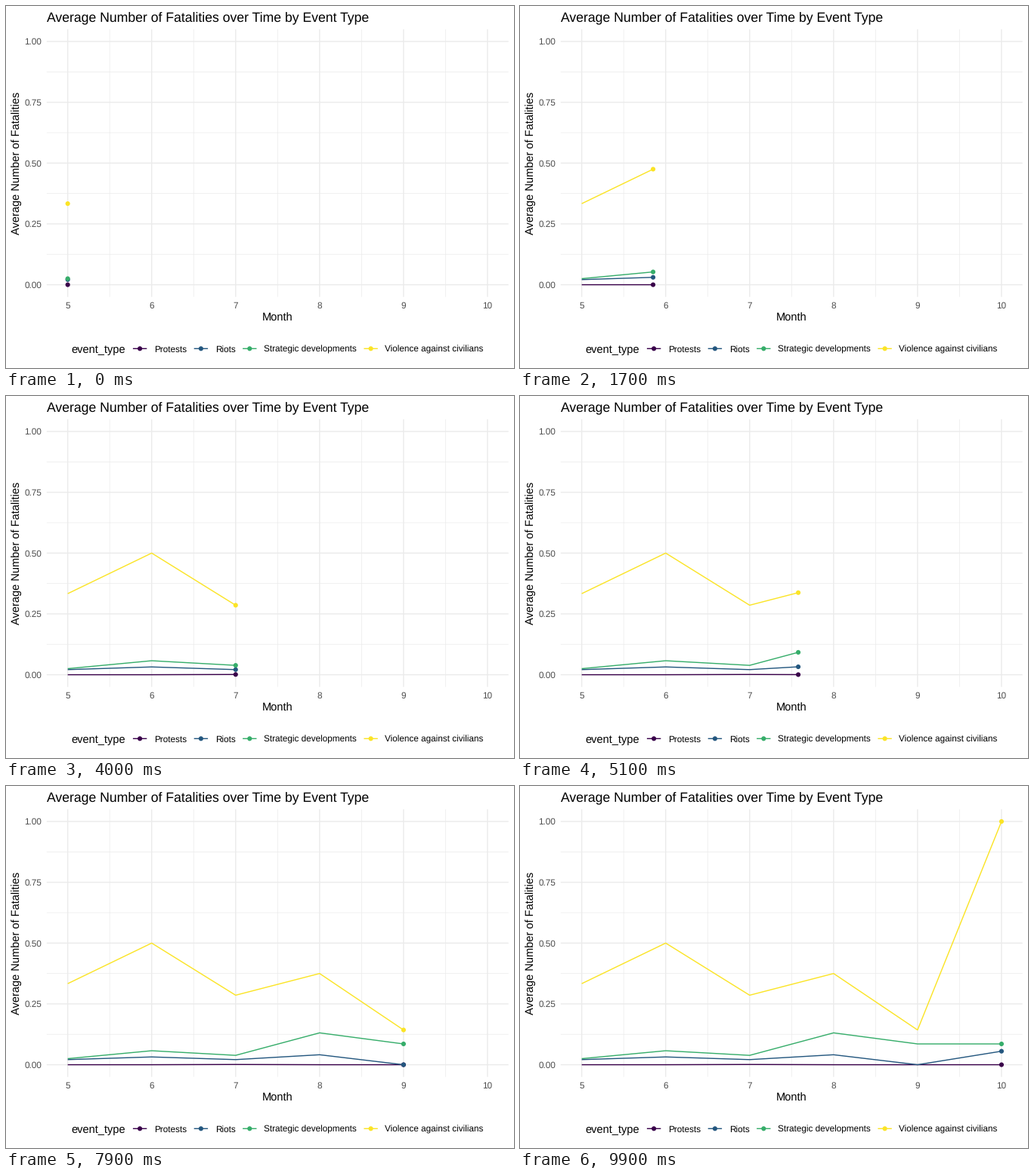
Animation of 672 by 480 pixels, one loop 10000 ms. Source, as a matplotlib script:

```python
import numpy as np
import matplotlib.pyplot as plt
from matplotlib.animation import FuncAnimation
from matplotlib.patches import Circle

W, H, DPI = 672, 480, 96
PX = 72 / DPI                      # one pixel in points
LEFT, RIGHT, TOP, BOTTOM = 53.9, 664.7, 30.9, 385.7
INK, GREY, GRID = "black", "#4d4d4d", "#ebebeb"

plt.rcParams.update({
    "font.family": "Liberation Sans",
    "text.hinting": "none",
    "text.hinting_factor": 8,
    "path.simplify": False,
})

MONTHS = np.arange(5, 11)
SERIES = [
    ("Protests", "#39004a", [0, 0, 0.001, 0, 0, 0], 177.1, 196.0),
    ("Riots", "#24577f", [0.021, 0.032, 0.021, 0.041, 0, 0.0555], 257.9, 276.7),
    ("Strategic developments", "#36ad6a",
     [0.025, 0.0575, 0.0385, 0.131, 0.0855, 0.0855], 322.3, 341.1),
    ("Violence against civilians", "#fbe426",
     [1 / 3, 1 / 2, 2 / 7, 3 / 8, 1 / 7, 1], 482.6, 501.4),
]
# Frame at which each month is reached
KEYS = [0, 20, 40, 59, 79, 99]


def px(month):
    return LEFT + (np.asarray(month) - 4.75) * (RIGHT - LEFT) / 5.5


def py(value):
    return BOTTOM - (np.asarray(value) + 0.05) * (BOTTOM - TOP) / 1.1


fig = plt.figure(figsize=(W / DPI, H / DPI), dpi=DPI, facecolor="white")
ax = fig.add_axes([0, 0, 1, 1])
ax.set_xlim(0, W)
ax.set_ylim(H, 0)
ax.axis("off")


def line(xs, ys, color, width=1.42, z=3):
    return ax.plot(xs, ys, color=color, lw=width * PX, zorder=z, snap=False,
                   solid_capstyle="butt", solid_joinstyle="round")[0]


def dot(x, y, color):
    return ax.add_patch(Circle((x, y), 3.07, fc=color, ec="none", zorder=4))


def label(x, y, s, size, color=INK, ha="left", **kw):
    ax.text(x, y, s, fontsize=size, color=color, ha=ha, va="baseline", **kw)


def draw_grid():
    for m in MONTHS[:-1] + 0.5:
        line([px(m)] * 2, [TOP, BOTTOM], GRID, 0.71, 1)
    for v in np.arange(0.125, 1, 0.25):
        line([LEFT, RIGHT], [py(v)] * 2, GRID, 0.71, 1)
    for m in MONTHS:
        line([px(m)] * 2, [TOP, BOTTOM], GRID, z=2)
        label(px(m), 401, str(m), 8.8, GREY, "center")
    for v in np.linspace(0, 1, 5):
        line([LEFT, RIGHT], [py(v)] * 2, GRID, z=2)
        label(47.3, py(v) + 4.2, f"{v:.2f}", 8.8, GREY, "right")


def draw_titles():
    label(LEFT - 0.4, 20, "Average Number of Fatalities over Time by Event Type", 13.2)
    label((LEFT + RIGHT) / 2, 418, "Month", 11, ha="center")
    label(18, (TOP + BOTTOM) / 2, "Average Number of Fatalities", 11,
          ha="center", rotation=90, rotation_mode="anchor")


def draw_legend():
    label(86.5, 460, "event_type", 11)
    for name, color, _, key_x, text_x in SERIES:
        line([key_x - 9.2, key_x + 9.2], [454.3] * 2, color)
        dot(key_x, 454.3, color)
        label(text_x, 459, name, 8.8)


draw_grid()
draw_titles()
draw_legend()
paths = [line([], [], s[1]) for s in SERIES]
heads = [dot(px(5), py(s[2][0]), s[1]) for s in SERIES]


def update(i):
    now = np.interp(i, KEYS, MONTHS)
    passed = MONTHS[MONTHS < now]
    xs = np.append(passed, now)
    for (_, _, values, *_), path, head in zip(SERIES, paths, heads):
        ys = np.interp(xs, MONTHS, values)
        path.set_data(px(xs), py(ys))
        head.center = px(now), py(ys[-1])
    return paths + heads


anim = FuncAnimation(fig, update, frames=100, interval=100,
                     repeat=True, repeat_delay=0, blit=False)
plt.show()
```
